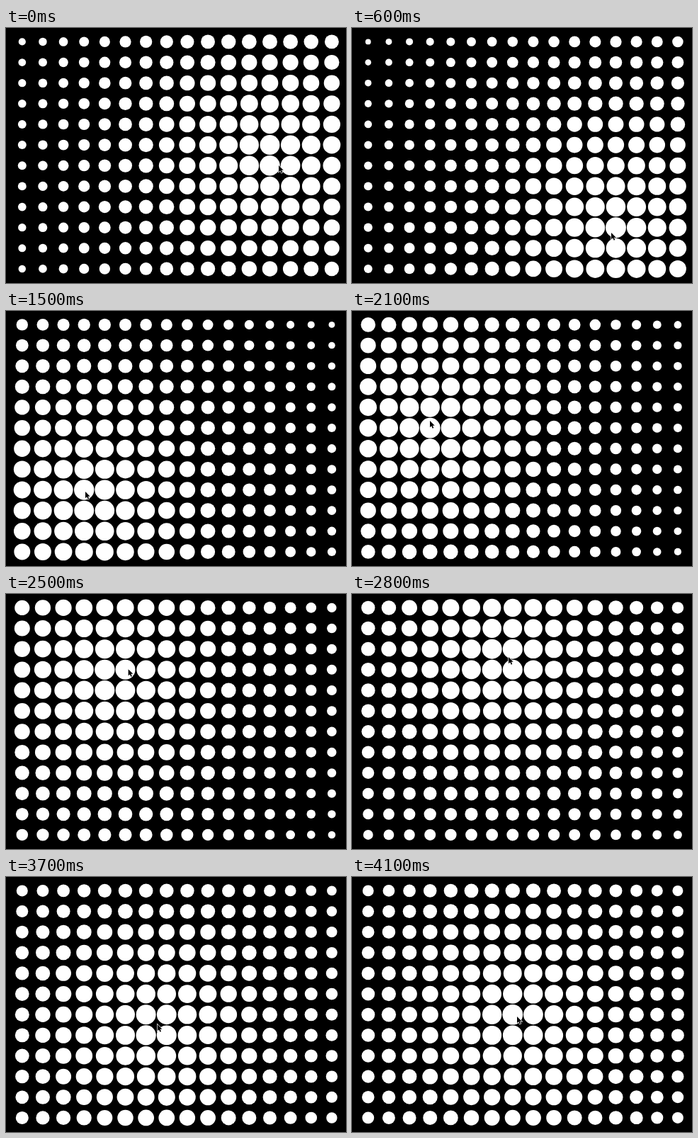
These frames come from a looping animation (480 px wide and 360 px high, 4.2 s). An HTML page with a canvas:

```html
<!DOCTYPE html>
<html lang="en">
<head>
<meta charset="utf-8">
<title>Dot grid</title>
<style>
  html, body { margin: 0; width: 100%; height: 100%; overflow: hidden; background: #000; }
  canvas { display: block; width: 480px; height: 360px; }
</style>
</head>
<body>
<canvas id="stage" width="480" height="360"></canvas>
<script>
const W = 480, H = 360;
const ctx = document.getElementById('stage').getContext('2d');
const LOOP = 4200, STEP = 100;
const COLS = 16, ROWS = 12, GAP = 29.14, LEFT = 22.8, TOP = 19.4;
const REACH = Math.hypot(W, H), MAX_R = 14.5;

// Key points of the pointer path
const path = [
  { t: -100, x: 374, y: 186 },
  { t: 0, x: 385, y: 194 },
  { t: 600, x: 366, y: 289 },
  { t: 1500, x: 112, y: 255 },
  { t: 2100, x: 110, y: 155 },
  { t: 2800, x: 221, y: 89 },
  { t: 3300, x: 235, y: 223 },
  { t: 3500, x: 207, y: 216 },
  { t: 4100, x: 233, y: 197 }
];
const arrow = new Path2D('M0 0V9.2L2.2 7.3L3.7 10.7L5.3 10L3.8 6.7H6.7Z');

// Harmonic mean of the neighbouring speeds, so the curve never overshoots
function speed(i, axis) {
  if (i === 0 || i === path.length - 1) return 0;
  const [a, b, c] = path.slice(i - 1, i + 2);
  const before = (b[axis] - a[axis]) / (b.t - a.t);
  const after = (c[axis] - b[axis]) / (c.t - b.t);
  return before * after > 0 ? 2 * before * after / (before + after) : 0;
}

function pointerAt(t) {
  const i = path.findLastIndex((p, n) => p.t <= t && n < path.length - 1);
  const a = path[i], b = path[i + 1], span = b.t - a.t;
  const u = (t - a.t) / span, v = 1 - u;
  return ['x', 'y'].map(axis =>
    a[axis] * v * v * (1 + 2 * u) + b[axis] * u * u * (3 - 2 * u) +
    span * u * v * (speed(i, axis) * v - speed(i + 1, axis) * u));
}

function drawDots(cx, cy) {
  ctx.fillStyle = '#fff';
  for (let row = 0; row < ROWS; row++) {
    for (let col = 0; col < COLS; col++) {
      const x = LEFT + col * GAP, y = TOP + row * GAP;
      const r = MAX_R * (1 - Math.hypot(x - cx, y - cy) / REACH);
      ctx.beginPath();
      ctx.arc(x, y, r, 0, Math.PI * 2);
      ctx.fill();
    }
  }
}

function drawArrow(x, y) {
  ctx.save();
  ctx.translate(x, y);
  ctx.strokeStyle = '#fff';
  ctx.lineWidth = 1.4;
  ctx.stroke(arrow);
  ctx.fillStyle = '#000';
  ctx.fill(arrow);
  ctx.restore();
}

// The picture moves in steps and pauses once
function stepped(t) {
  return t >= 1500 && t < 1800 ? 1500 : Math.floor(t / STEP) * STEP;
}

const start = performance.now();
function tick() {
  const t = stepped((performance.now() - start) % LOOP);
  ctx.fillStyle = '#000';
  ctx.fillRect(0, 0, W, H);
  drawDots(...pointerAt(t - STEP)); // dots trail the pointer by one step
  drawArrow(...pointerAt(t));
  requestAnimationFrame(tick);
}
tick();
</script>
</body>
</html>
```
